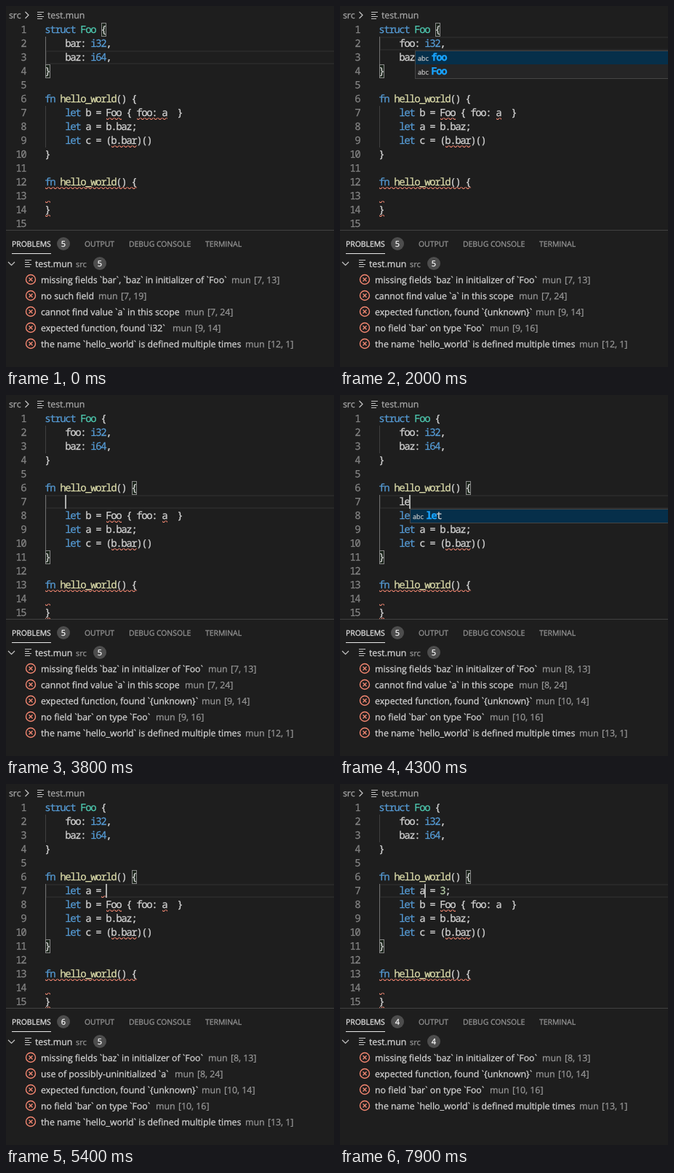
An HTML page for the animation above (8000 ms loop, 451 px wide and 495 px high).

```html
<!DOCTYPE html>
<html lang="en">
<head>
<meta charset="utf-8">
<title>Editor diagnostics</title>
<style>
html, body { margin: 0; width: 100%; height: 100%; overflow: hidden; background: #1e1e1e; }
svg { display: block; width: 451px; height: 495px; }
text {
  font: 12.3px "Open Sans", "Noto Sans", sans-serif; text-rendering: geometricPrecision;
  color: #d6d6d6; fill: currentColor; stroke: currentColor; stroke-width: .25px;
}
.code { font: 500 14px "Noto Sans Mono", monospace; letter-spacing: -1.4px; color: #d4d4d4; }
.dim { color: #989898; }
.tab { font-size: 10.4px; color: #989898; }
.small { font-size: 11px; }
.crumb { color: #a9a9a9; }
.abc { font-size: 9px; color: #c5c5c5; }
.hit { font-weight: 700; color: #18a3ff; }
.line { fill: none; stroke: #c5c5c5; stroke-width: 1.2; }
.error { fill: none; stroke: #f48771; stroke-width: 1.4; }
</style>
</head>
<body>
<svg viewBox="0 0 451 495">
  <defs>
    <pattern id="wave" width="6" height="3" patternUnits="userSpaceOnUse">
      <path fill="#f48771" d="M5.5 0 2.5 3H1.1L4.1 0ZM4 0 6 2V.6L5.4 0ZM0 2 1 3H2.4L0 .6Z"/>
    </pattern>
  </defs>
  <g id="view"></g>
</svg>
<script>
const LOOP = 8000, LEFT = 54, CELL = 7, ROW = 19;
const colX = c => LEFT + CELL * c;
const lineY = n => 4 + ROW * n;

// Problems: message, x of the "mun" label, line, column
const missingTwo = ['missing fields `bar`, `baz` in initializer of `Foo`', 310, 7, 13];
const missing = ['missing fields `baz` in initializer of `Foo`', 278, 7, 13];
const noSuch = ['no such field', 127, 7, 19];
const unknownA = ['cannot find value `a` in this scope', 246, 7, 24];
const unsetA = ['use of possibly-uninitialized `a`', 232, 7, 24];
const callInt = ['expected function, found `i32`', 229, 9, 14];
const callUnknown = ['expected function, found `{unknown}`', 269, 9, 14];
const noField = ['no field `bar` on type `Foo`', 206, 9, 16];
const twice = ['the name `hello_world` is defined multiple times', 329, 12, 1];
const unknownLe = ['cannot find value `le` in this scope', 249, 6, 5];
const noExpr = ['expected expression', 171, 6, 12];

const foo = [12, 15], field = [18, 24], argA = [23, 24];
const tail = [callUnknown, noField, twice];

// Each step changes part of the state from its time on
const steps = [
  [0, { name: 'bar', extra: null, line: 3, col: 7, on: false, sel: false, match: false, pop: null,
        shift: 0, waves: [foo, field], errs: [missingTwo, noSuch, unknownA, callInt, twice], count: 5, gap: false }],
  [500, { line: 2, col: 4, on: true }],
  [600, { col: 7, sel: true }],
  [700, { match: true }],
  [1100, { on: false }],
  [1300, { name: 'f', col: 5, on: true, sel: false, match: false }],
  [1400, { name: 'fo', col: 6, pop: ['foo', 'Foo'], typed: 2 }],
  [1500, { name: 'foo', col: 7, typed: 3 }],
  [1800, { errs: [missing, unknownA, ...tail], waves: [foo, argA] }],
  [2000, { on: false }],
  [2500, { on: true, pop: null }],
  [2800, { line: 3 }],
  [3000, { line: 4, col: 1 }],
  [3100, { line: 5, col: 0 }],
  [3200, { line: 6, col: 7 }],
  [3500, { col: 14 }],
  [3600, { col: 16 }],
  [3700, { col: 18 }],
  [3800, { extra: '', line: 7, col: 4 }],
  [4000, { shift: 1 }],
  [4300, { extra: 'le', col: 6, pop: ['let'], typed: 2 }],
  [4400, { extra: 'let', col: 7, typed: 3 }],
  [4500, { extra: 'let ', col: 8, pop: null }],
  [4600, { errs: [unknownLe, missing, unknownA, ...tail], count: 6 }],
  [4700, { extra: 'let a', col: 9 }],
  [4900, { extra: 'let a ', col: 10 }],
  [5000, { errs: [missing, unsetA, ...tail], count: 5 }],
  [5200, { extra: 'let a = ', col: 12 }],
  [5400, { count: 6, gap: true }],
  [5500, { errs: [noExpr, missing, unsetA, ...tail] }],
  [5600, { extra: 'let a = 3', col: 13 }],
  [5700, { extra: 'let a = 3;', col: 14 }],
  [5900, { errs: [missing, ...tail], count: 4, waves: [foo], gap: false }],
  [6200, { on: false }],
  [6600, { on: true }],
  [7100, { col: 13 }],
  [7200, { col: 12 }],
  [7400, { col: 11 }],
  [7500, { col: 10 }],
  [7900, { col: 9 }]
];

const pen = document.createElement('canvas').getContext('2d');
pen.font = '12.3px "Open Sans", "Noto Sans", sans-serif';

const rect = (x, y, w, h, fill, more = '') =>
  `<rect x="${x}" y="${y}" width="${w}" height="${h}" fill="${fill}" ${more}/>`;
const text = (x, y, str, cls = '', more = '') =>
  `<text x="${x}" y="${y}" class="${cls}" ${more}>${str}</text>`;
const path = (d, cls = 'line') => `<path d="${d}" class="${cls}"/>`;
const wave = (n, from, to) =>
  `<g transform="translate(${colX(from)} ${lineY(n) + 16})">${rect(0, 0, CELL * (to - from), 3, 'url(#wave)')}</g>`;
const badge = (x, y, n) =>
  `<circle cx="${x}" cy="${y}" r="9" fill="#4d4d4d"/>` + text(x, y + 4, n, 'small', 'text-anchor="middle" style="color:#fff"');

function color(word, src) {
  if (/^(struct|fn|let|i32|i64)$/.test(word)) return '#569cd6';
  if (word === 'Foo' && src.startsWith('struct')) return '#4ec9b0';
  if (word === 'hello_world') return '#dcdcaa';
  return /^\d/.test(word) ? '#b5cea8' : '#d4d4d4';
}

function codeLine(src, n) {
  return [...src.matchAll(/\w+|[^\s\w]/g)].map(m =>
    text(colX(m.index) - .7, lineY(n) + 14, m[0], 'code', `style="color:${color(m[0], src)}"`)).join('');
}

// Backticks get a narrow cell of their own
function message(str, x, y) {
  return str.split(/(`)/).map(part => {
    const tick = part === '`', w = tick ? 3.5 : pen.measureText(part).width;
    const out = tick ? text(x + w / 2, y, part, '', 'text-anchor="middle"')
                     : text(x, y, part, '', 'style="white-space:pre"');
    x += w;
    return out;
  }).join('');
}

function editor(s) {
  const add = s.extra === null ? 0 : 1;
  const lines = [
    'struct Foo {', `    ${s.name}: i32,`, '    baz: i64,', '}', '',
    'fn hello_world() {', ...(add ? ['    ' + s.extra] : []),
    '    let b = Foo { foo: a  }', '    let a = b.baz;', '    let c = (b.bar)()', '}', '',
    'fn hello_world() {', '', '}', ''
  ].slice(0, 15);
  const end = 10 + add, inStruct = s.line < 5, inFn = s.line > 5;
  let out = '';

  if (!s.sel) out += rect(LEFT + 1, lineY(s.line) + 1, 410, ROW - 2, 'none', 'stroke="#282828" stroke-width="2"');
  else out += rect(colX(4), lineY(2), 3 * CELL, ROW, '#264f78');
  if (s.match) out += rect(colX(15), lineY(9), 3 * CELL, ROW, '#343a40');

  out += rect(LEFT, lineY(2), 1, 2 * ROW, inStruct ? '#707070' : '#404040');
  out += rect(LEFT, lineY(7), 1, (end - 7) * ROW, inFn ? '#707070' : '#404040');

  let pair = [];
  if (inStruct && !s.sel) pair = [[1, 11], [4, 0]];
  else if (s.line === 7 || s.line === 6 && s.col > 16) pair = [[6, 17], [end, 0]];
  for (const [n, c] of pair)
    out += rect(colX(c) + .5, lineY(n) + .5, CELL - 1, ROW - 1, '#1b251b', 'stroke="#888"');

  lines.forEach((src, i) => {
    const n = i + 1;
    out += text(27.3 - CELL * String(n).length, lineY(n) + 14, n, 'code', 'style="color:#858585"') + codeLine(src, n);
  });

  for (const [a, b] of s.waves) out += wave(7 + add, a, b);
  out += wave(9 + add, 13, 18) + wave(12 + add, 0, 18) + wave(13 + add, 0, 1) + wave(14 + add, 0, 1);
  if (s.gap) out += wave(7, 11, 12);
  if (s.on) out += rect(colX(s.col) - 1, lineY(s.line), 2, ROW, '#aeafad');
  if (s.pop) out += popup(s);
  return out;
}

function popup(s) {
  const x = colX(s.col), y = lineY(s.line + 1);
  let out = rect(x + .5, y + .5, 400, s.pop.length * ROW, '#252526', 'stroke="#454545"');
  s.pop.forEach((word, i) => {
    const top = y + i * ROW;
    if (!i) out += rect(x + 1, top + 1, 400, ROW - 1, '#062f4a');
    out += text(x + 4, top + 14, 'abc', 'abc')
      + text(x + 22.3, top + 14, word.slice(0, s.typed), 'code hit')
      + text(x + 22.3 + CELL * s.typed, top + 14, word.slice(s.typed), 'code');
  });
  return out;
}

const fileIcon = (x, y) => path(`M${x} ${y - 3.5}h9M${x} ${y - .5}h6M${x} ${y + 2.5}h9M${x} ${y + 5.5}h7`);

function panel(s) {
  let out = rect(0, 308, 451, 187, '#1e1e1e') + rect(0, 307, 451, 1, '#414141');
  out += text(8, 330, 'PROBLEMS', 'tab', 'style="color:#e7e7e7"') + rect(8, 339, 54, 1, '#e7e7e7') + badge(79, 326, s.count);
  out += text(108, 330, 'OUTPUT', 'tab') + text(169, 330, 'DEBUG CONSOLE', 'tab') + text(274, 330, 'TERMINAL', 'tab');
  out += path('M3 351l4.5 4.5 4.5-4.5') + fileIcon(26, 352);
  out += text(40, 358, 'test.mun') + text(96, 358, 'src', 'dim small') + badge(129, 353, s.errs.length);
  s.errs.forEach(([msg, x, line, col], i) => {
    const y = 375 + 22 * i;
    out += `<circle cx="34" cy="${y}" r="6.5" class="error"/>`
      + path(`M31.5 ${y - 2.5}l5 5m0-5l-5 5`, 'error')
      + message(msg, 48, y + 5)
      + text(x, y + 5, 'mun', 'dim') + text(x + 31, y + 5, `[${line + s.shift}, ${col}]`, 'dim');
  });
  return out;
}

const crumbs = text(4, 17, 'src', 'crumb') + path('M26.5 8l4.5 4.5-4.5 4.5')
  + fileIcon(43, 12) + text(57, 17, 'test.mun', 'crumb');

const view = document.getElementById('view');
let shown = 0;

function draw() {
  const t = performance.now() % LOOP;
  const past = steps.filter(([at]) => at <= t);
  if (past.length !== shown) {
    shown = past.length;
    const s = Object.assign({}, ...past.map(([, change]) => change));
    view.innerHTML = crumbs + editor(s) + panel(s);
  }
  requestAnimationFrame(draw);
}
draw();
</script>
</body>
</html>
```
